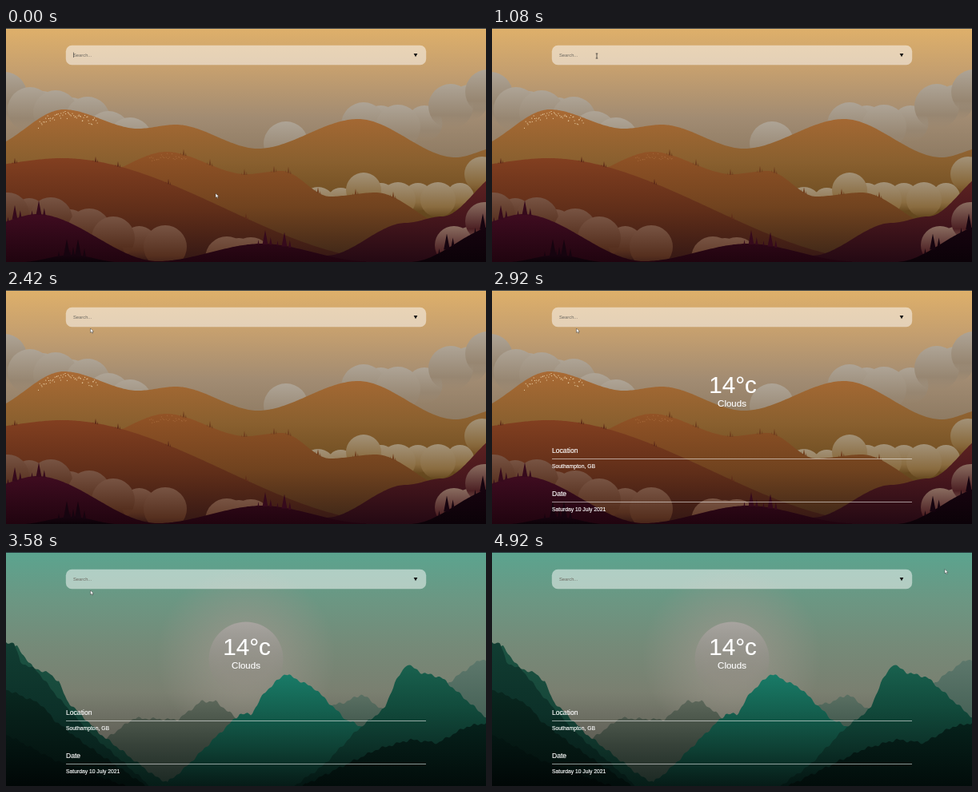
An HTML page that plays this animation: 600x293 px, repeating every 5010 ms.

```html
<!DOCTYPE html>
<html lang="en">
<head>
<meta charset="utf-8">
<title>Weather search</title>
<style>
html, body { margin: 0; width: 100%; height: 100%; overflow: hidden; background: #000; }
svg { display: block; width: 100vw; height: 100vh; }
text { font-family: "Liberation Sans", Arial, sans-serif; fill: #fff; }
#report text { stroke: #fff; stroke-width: .15; }
.mid { text-anchor: middle; }
</style>
</head>
<body>
<svg viewBox="0 0 600 293" preserveAspectRatio="none">
  <defs>
    <radialGradient id="glow">
      <stop offset=".3" stop-color="#a0988e" stop-opacity=".6"/>
      <stop offset="1" stop-color="#a0988e" stop-opacity="0"/>
    </radialGradient>
    <linearGradient id="disc" x2="0" y2="1">
      <stop stop-color="#a8a4a0"/>
      <stop offset="1" stop-color="#857f78" stop-opacity="0"/>
    </linearGradient>
  </defs>
  <g id="dusk"></g>
  <g id="peaks"></g>
  <rect x="74.8" y="21.7" width="450.4" height="24.6" rx="7.5" fill="#fff" fill-opacity=".5"/>
  <text x="84" y="35.7" font-size="5.8" style="fill:#6b675f">Search...</text>
  <path id="caret" d="M84.5 30.5v6.5" stroke="#333" stroke-width=".6"/>
  <path d="M509.6 32h4.8l-2.4 4.3z" fill="#111"/>
  <g id="report">
    <text class="mid" x="301" y="129.2" font-size="29.6">14°c</text>
    <text class="mid" x="300" y="146" font-size="11.5">Clouds</text>
    <text x="75" y="204" font-size="8.6">Location</text>
    <text x="75" y="223" font-size="6.8">Southampton, GB</text>
    <text x="75" y="258" font-size="8.6">Date</text>
    <text x="75" y="277.2" font-size="6.75">Saturday 10 July 2021</text>
    <path d="M75 211.5H525M75 265.5H525" stroke="#fff" stroke-opacity=".55"/>
  </g>
  <path id="arrow" d="M0 0v5.4l1.3-1.1 1 2 .9-.4-.9-1.9h1.7z" fill="#fff" stroke="#222" stroke-width=".4"/>
  <path id="beam" d="M-1.3-3H1.3M0-3V3M-1.3 3H1.3" stroke="#222" stroke-width=".7" fill="none"/>
</svg>
<script>
const $ = id => document.getElementById(id);
const LOOP = 5010, WIDTH = 600, FLOOR = 293;
const clamp = v => Math.min(1, Math.max(0, v));
const smooth = v => v * v * (3 - 2 * v);
const lerp = (a, b, k) => a + (b - a) * k;

let seed = 7, gradients = 0;
const random = () => (seed = seed * 16807 % 2147483647) / 2147483647;

// Value at x between key points [x, ...values], with an easing on each stretch
function between(keys, x, ease) {
  const i = Math.max(1, keys.findIndex(key => key[0] >= x));
  const [x0, ...from] = keys[i - 1], [x1, ...to] = keys[i];
  const k = ease(clamp((x - x0) / (x1 - x0)));
  return from.map((v, n) => lerp(v, to[n], k));
}
// Skylines: a hill rolls through its crests and hollows, a crag is straight with a rough edge
const hill = keys => ({ keys, y: x => between(keys, x, smooth)[0] });
const crag = keys => ({ keys, y: x => between(keys, x, k => k)[0] + Math.sin(x * .33) + Math.sin(x * .71 + keys[0][1]) });

function gradient(top, bottom, colours) {
  const id = 'g' + gradients++;
  const stops = colours.map((c, i) => `<stop offset="${i / (colours.length - 1)}" stop-color="${c}"/>`).join('');
  return [`<linearGradient id="${id}" gradientUnits="userSpaceOnUse" x1="0" x2="0" y1="${top}" y2="${bottom}">${stops}</linearGradient>`, `url(#${id})`];
}
function land({ keys, y }, ...colours) {
  const left = keys[0][0], right = keys.at(-1)[0];
  const [def, paint] = gradient(Math.min(...keys.map(k => k[1])), FLOOR, colours);
  let d = `M${left} ${FLOOR}`;
  for (let x = left; x <= right; x += 2) d += `L${x} ${y(x).toFixed(1)}`;
  return `${def}<path d="${d}L${right} ${FLOOR}z" fill="${paint}"/>`;
}
function sky(bottom, line, ...colours) {
  const [def, paint] = gradient(0, bottom, colours);
  return `${def}<rect width="${WIDTH}" height="${FLOOR}" fill="${paint}"/><rect width="${WIDTH}" height="1" fill="${line}"/>`;
}
// Round puffs at [x, top]; a smaller one fills each narrow gap
function clouds(r, light, base, puffs) {
  const id = 'g' + gradients++;
  const puff = (x, top, r) => `<circle cx="${x}" cy="${top + r}" r="${r}" fill="url(#${id})"/>`;
  const fillers = puffs.slice(1).map(([x, top], i) => {
    const [px, ptop] = puffs[i];
    return x - px < 75 ? puff((x + px) / 2, Math.max(top, ptop) + 1, r * .8) : '';
  });
  return `<linearGradient id="${id}" x2="0" y2="1"><stop stop-color="${light}"/><stop offset=".7" stop-color="${base}"/>
    <stop offset="1" stop-color="${base}" stop-opacity="0"/></linearGradient>` +
    fillers.join('') + puffs.map(([x, top]) => puff(x, top, r)).join('');
}
// Each clump is a tall fir with two shorter neighbours
function firs({ y }, height, colour, places) {
  const fir = (x, h) => `M${x - h * .2} ${y(x) + 1}L${x} ${y(x) - h}L${x + h * .2} ${y(x) + 1}z`;
  const d = places.map(x => fir(x, height) + fir(x + height * .4, height * .5) + fir(x - height * .5, height * .3));
  return `<path d="${d.join('')}" fill="${colour}"/>`;
}
function speckles({ y }, count, x0, x1, depth, colour) {
  let d = '';
  for (let i = 0; i < count; i++) {
    const x = lerp(x0, x1, (i + random()) / count);
    d += `M${x.toFixed(1)} ${(y(x) + 2 + random() * depth).toFixed(1)}h1`;
  }
  return `<path d="${d}" stroke="${colour}"/>`;
}

const far = hill([[-25, 150], [72, 102], [165, 126], [212, 121], [315, 151], [440, 114], [562, 162], [620, 148]]);
const middle = hill([[110, 184], [200, 155], [300, 183], [345, 179], [405, 211], [462, 206], [560, 250], [600, 255]]);
const near = hill([[-60, 176], [70, 163], [480, 290]]);
const slope = hill([[400, 285], [500, 244], [545, 236], [625, 178]]);
const front = hill([[-20, 246], [38, 233], [190, 292], [320, 270], [450, 292]]);
const corners = [hill([[20, 293], [82, 284], [140, 293]]), hill([[505, 293], [620, 246]])];

$('dusk').innerHTML =
  sky(170, '#39424a', '#dfb06a', '#c39e6f', '#a18b72', '#8b7860') +
  clouds(28, '#aea496', '#978671', [[-2, 55], [30, 74], [62, 78], [102, 86], [128, 104], [155, 112], [350, 117], [447, 93], [490, 96], [556, 70], [602, 52]]) +
  land(far, '#aa6a34', '#8a602f', '#67491f', '#402f16') +
  speckles(far, 55, 40, 114, 10, '#ecd3aa') +
  clouds(22, '#a39278', '#8a6c40', [[390, 199], [447, 181], [490, 193], [540, 193], [595, 161]]) +
  land(middle, '#925326', '#71431f', '#3a2417') +
  speckles(middle, 28, 178, 226, 7, '#a5693a') +
  firs(middle, 7, '#71401f', [222, 255, 298, 335, 353, 390, 437, 484]) +
  land(near, '#823f20', '#602e19', '#331714') +
  firs(near, 6, '#5f2c19', [11, 112, 140, 203, 300]) +
  clouds(27, '#785443', '#56301f', [[2, 206], [56, 212], [104, 226], [134, 236], [199, 247], [276, 261], [306, 262]]) +
  land(slope, '#622522', '#47171d', '#240913') +
  clouds(24, '#8a6d60', '#4c2023', [[560, 248], [598, 218]]) +
  land(front, '#3f0c20', '#20040f') +
  firs(front, 17, '#360a1c', [11, 41, 324, 348]) +
  corners.map(c => land(c, '#17040f', '#0b0208')).join('') +
  firs(corners[0], 20, '#16040f', [76, 90]) +
  firs(corners[1], 19, '#16040f', [551, 596]);

$('peaks').innerHTML =
  sky(235, '#24343a', '#5ba48f', '#6b9783', '#758a78', '#7a7f70', '#605f56') +
  '<circle cx="300" cy="130" r="112" fill="url(#glow)"/><circle cx="300" cy="134" r="46.5" fill="url(#disc)"/>' +
  land(crag([[520, 190], [567, 153], [594, 134], [600, 136]]), '#5d786c', '#2c463c') +
  land(crag([[360, 230], [405, 193], [424, 188], [445, 178], [500, 220]]), '#5a7063', '#1a2f27') +
  land(crag([[110, 245], [160, 208], [215, 210], [244, 187], [262, 187], [340, 250]]), '#5b6659', '#38433a', '#1a2722') +
  land(crag([[196, 293], [222, 272], [268, 226], [292, 203], [307, 203], [323, 176], [349, 152], [386, 171], [425, 210], [448, 220], [510, 293]]),
    '#197c68', '#14604f', '#0e4034', '#061b17') +
  land(crag([[360, 293], [397, 267], [440, 222], [473, 196], [486, 164], [501, 140], [519, 151], [544, 157], [574, 184], [600, 207]]),
    '#19624f', '#124c3d', '#0c3229', '#031411') +
  land(crag([[0, 114], [14, 119], [34, 145], [54, 152], [66, 162], [76, 186], [118, 228], [185, 280], [210, 293]]), '#1c5443', '#164538', '#061c17') +
  land(crag([[0, 113], [10, 114], [18, 138], [38, 148], [60, 176], [100, 222], [180, 293]]), '#113d32', '#0c3028', '#041512') +
  land(crag([[0, 172], [43, 190], [61, 211], [98, 240], [175, 293]]), '#09271f', '#020d0b') +
  land(crag([[370, 293], [464, 247], [505, 235], [540, 239], [575, 219], [600, 214]]), '#06211b', '#020c0a') +
  land(crag([[0, 228], [60, 260], [150, 293]]), '#041713', '#010706');

// Pointer stops: time, x, y
const route = [[0, 262, 207], [200, 262, 207], [900, 131, 35], [1250, 131, 35], [1600, 105.5, 48],
  [3600, 105.5, 48], [4000, 119, 47.5], [4250, 119, 47.5], [4800, 566, 21.5], [LOOP, 566, 21.5]];
const show = (id, on) => $(id).setAttribute('visibility', on ? 'visible' : 'hidden');

function draw(now) {
  const t = now % LOOP;
  const [x, y] = between(route, t, smooth);
  const overField = x > 75 && x < 500 && y > 22 && y < 46;
  for (const id of ['arrow', 'beam']) $(id).setAttribute('transform', `translate(${x} ${y})`);
  show('arrow', !overField);
  show('beam', overField);
  show('caret', t < 500 || t > 3050 && (t - 3050) % 1000 < 500);
  show('report', t >= 2830);
  $('peaks').setAttribute('opacity', 1 - (1 - clamp((t - 2980) / 400)) ** 2);
}
const start = performance.now();
requestAnimationFrame(function tick() {
  draw(performance.now() - start);
  requestAnimationFrame(tick);
});
</script>
</body>
</html>
```
